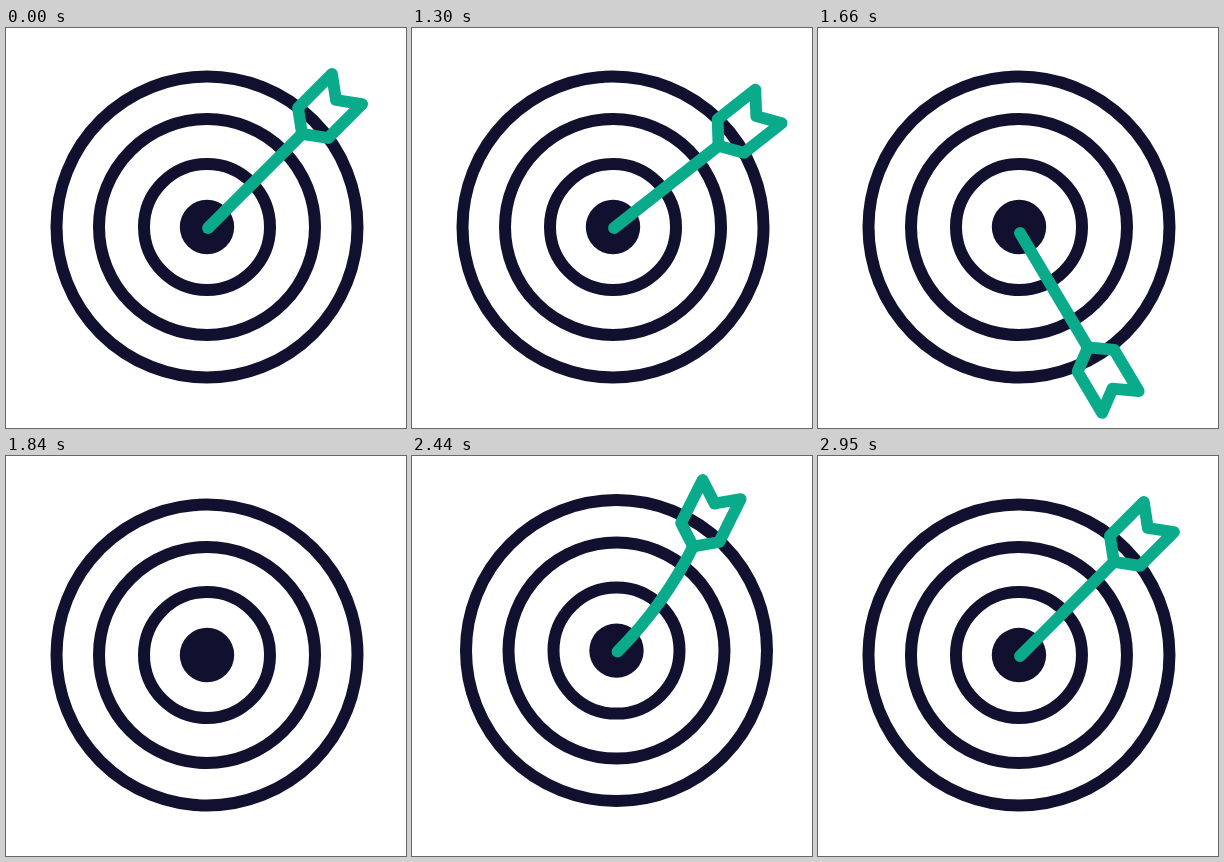
Animation, 400 px wide and 400 px high, one loop 2.98 s. Source, as an HTML page:

```html
<!DOCTYPE html>
<html lang="en">
<head>
<meta charset="utf-8">
<title>Target and arrow</title>
<style>
  html, body { margin: 0; width: 100%; height: 100%; overflow: hidden; background: #fff; }
  svg { display: block; width: 100vw; height: 100vh; }
  .rings { fill: none; stroke: #11112f; stroke-width: 12; }
  .rings .bull { fill: #11112f; stroke: none; }
  .arrow { fill: none; stroke: #0aab8b; stroke-width: 11.8; stroke-linecap: round; stroke-linejoin: round; }
</style>
</head>
<body>
<svg viewBox="0 0 400 400">
  <g id="scene">
    <g class="rings">
      <circle cx="201" cy="199" r="150.5"/>
      <circle cx="201" cy="199" r="108"/>
      <circle cx="201" cy="199" r="63"/>
      <circle class="bull" cx="201" cy="199" r="27.2"/>
    </g>
    <g id="arrow" class="arrow">
      <path id="shaft"/>
      <path id="fletch" d="M0 0L15.6-21.3H63.6L48 0L63.6 21.3H15.6Z"/>
    </g>
  </g>
</svg>
<script>
const LOOP = 2980;
const SWING = 1000, DROP = 1630, GONE = 1840, FLY = 2180, HIT = 2260, PEAK = 2290;
const HALF = 66.5; // half the shaft length

// time and shaft bend in degrees while the arrow quivers
const QUIVER = [[HIT, 0], [2320, 20], [2440, -18.5], [2560, 9],
                [2670, -4], [2770, 1.2], [2870, -0.4], [LOOP, 0]];

const [scene, arrow, shaft, fletch] =
  ['scene', 'arrow', 'shaft', 'fletch'].map(id => document.getElementById(id));

function bendAt(t) {
  const i = QUIVER.findIndex(([time]) => time > t);
  if (i < 1) return 0;
  const [t0, a] = QUIVER[i - 1], [t1, b] = QUIVER[i];
  return a + (b - a) * (1 - Math.cos(Math.PI * (t - t0) / (t1 - t0))) / 2;
}

// recoil of the whole target: a quick push, then a damped swing
function recoilAt(t) {
  if (t < HIT) return 0;
  if (t < PEAK) return Math.sin((t - HIT) / (PEAK - HIT) * Math.PI / 2);
  const s = t - PEAK;
  return Math.cos(Math.PI * s / 150) * Math.exp(-s / 160);
}

function poseAt(t) {
  if (t < FLY) {
    const turn = 51.7 * (Math.max(0, t - SWING) / 540) ** 3.47;
    const fall = 210 * (Math.max(0, t - DROP) / 200) ** 2;
    return { angle: Math.min(96, turn - 45), fall, away: 0, shown: t < GONE };
  }
  const away = 290 * Math.max(0, (HIT - t) / (HIT - FLY));
  return { angle: -45, fall: 0, away, shown: true };
}

function draw(t) {
  const { angle, fall, away, shown } = poseAt(t);
  const recoil = recoilAt(t);
  scene.setAttribute('transform', `translate(${-9 * recoil} ${11.3 * recoil})`);
  arrow.setAttribute('visibility', shown ? 'visible' : 'hidden');
  arrow.setAttribute('transform', `translate(202 ${200 + fall}) rotate(${angle}) translate(${away})`);

  const bend = bendAt(t), rad = bend * Math.PI / 180;
  const half = HALF * Math.cos(rad / 2);
  const x = half * (1 + Math.cos(rad)), y = half * Math.sin(rad);
  shaft.setAttribute('d', `M0 0Q${half} 0 ${x} ${y}`);
  fletch.setAttribute('transform', `translate(${x} ${y}) rotate(${bend})`);
}

function tick() {
  draw(performance.now() % LOOP);
  requestAnimationFrame(tick);
}
tick();
</script>
</body>
</html>
```
